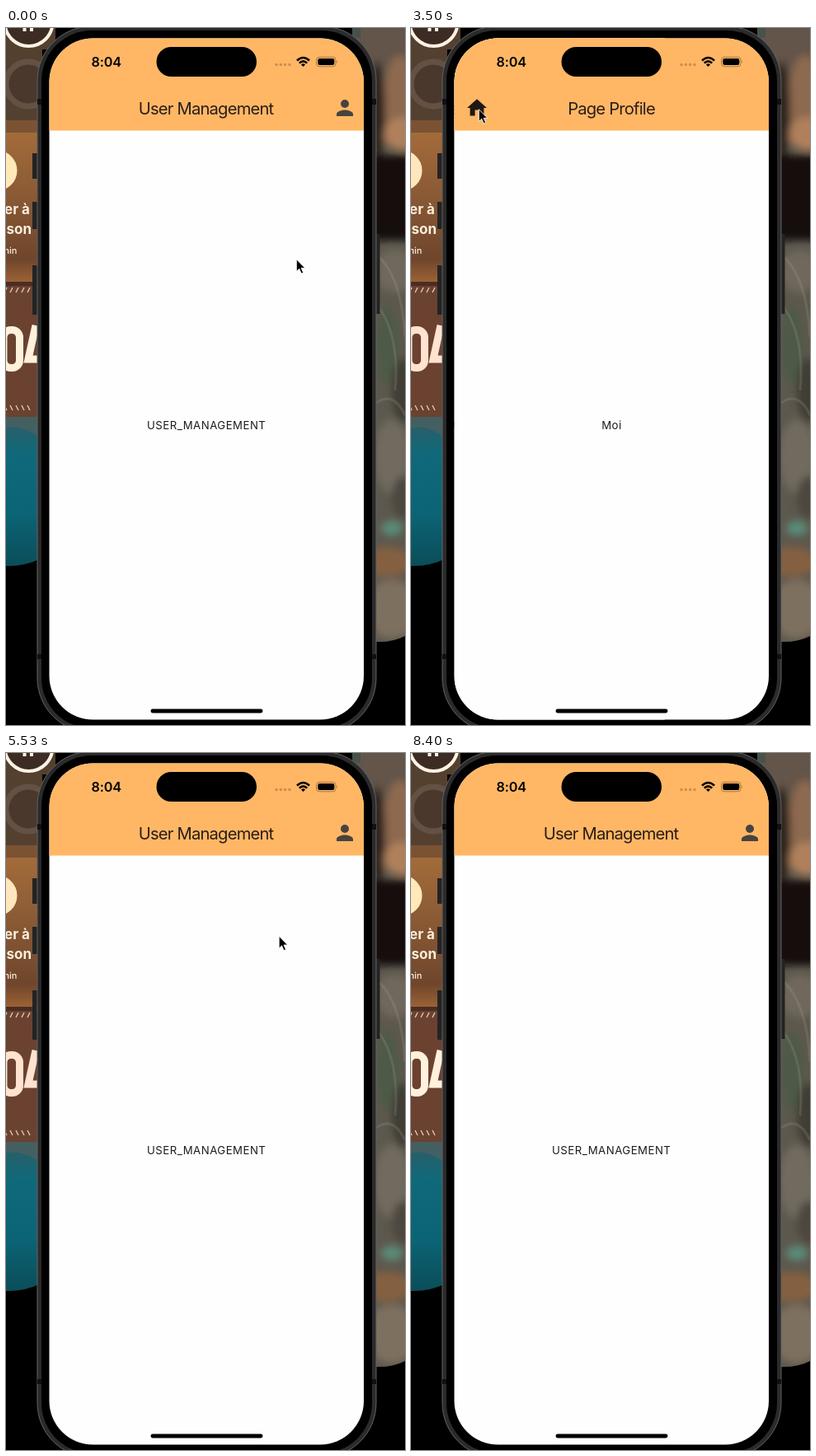
Animation of 484 by 846 pixels, one loop 8.82 s. Source, as an HTML page:

```html
<!DOCTYPE html>
<html lang="en">
<head>
<meta charset="utf-8">
<title>Page transition</title>
<style>
  html, body { margin: 0; height: 100%; overflow: hidden; background: #000; }
  svg { display: block; width: 484px; height: 846px; font-family: Inter, "Open Sans", sans-serif; }
  .title { font-size: 20.2px; letter-spacing: -.8px; text-anchor: middle; fill: #2b1d18; }
  .body { font-size: 13.2px; letter-spacing: .5px; text-anchor: middle; fill: #1d1b20; }
  .wall text { font-weight: 700; text-anchor: end; fill: #fbeedd; }
</style>
</head>
<body>
<svg viewBox="0 0 484 846">
  <defs>
    <clipPath id="screen"><rect x="52.5" y="12.5" width="381.5" height="827" rx="53"/></clipPath>
    <clipPath id="left"><rect width="44" height="846"/></clipPath>
    <clipPath id="right"><path d="M420 0H484V738Q468 746 449 745H420Z"/></clipPath>
    <filter id="soft" x="-50%" y="-50%" width="200%" height="200%"><feGaussianBlur stdDeviation="5"/></filter>
    <linearGradient id="wood" x2="0" y2="1">
      <stop stop-color="#a36b3a"/><stop offset=".35" stop-color="#8e5d36"/>
      <stop offset=".85" stop-color="#6f462c"/><stop offset="1" stop-color="#9c6236"/>
    </linearGradient>
    <linearGradient id="sea" x2="0" y2="1">
      <stop stop-color="#2f5c63"/><stop offset=".25" stop-color="#10697a"/>
      <stop offset=".65" stop-color="#0b6475"/><stop offset="1" stop-color="#0b4d59"/>
    </linearGradient>
    <linearGradient id="edge"><stop stop-color="#000" stop-opacity=".03"/><stop offset="1" stop-color="#000" stop-opacity=".04"/></linearGradient>
  </defs>

  <g class="wall" clip-path="url(#left)">
    <rect width="60" height="118" fill="#54402f"/>
    <rect y="112" width="60" height="16" fill="#7b5333"/>
    <circle cx="27" cy="68" r="27" fill="#4a382d" stroke="#655144" stroke-width="7"/>
    <rect y="127" width="60" height="181" fill="url(#wood)"/>
    <circle id="disc" cx="-11" cy="173" r="24.5"/>
    <text x="29" y="226" font-size="17">er à</text>
    <text x="31" y="250" font-size="17">son</text>
    <text x="13.5" y="274" font-size="11" style="font-weight:500">min</text>
    <rect y="308" width="60" height="164" fill="#6b4130"/>
    <rect y="308" width="60" height="5" fill="#4a2d22"/>
    <path d="M-2 321l3-6m4 6l3-6m4 6l3-6m4 6l3-6m4 6l3-6m4 6l3-6M1 464l-3-6m10 6l-3-6m10 6l-3-6m10 6l-3-6m10 6l-3-6" stroke="#e8cdbb" stroke-width="1.3"/>
    <g id="digits" fill="none" stroke-width="9">
      <rect x="-3" y="366.500" width="19.500" height="46" rx="9"/>
      <path d="M36 361L27 402H46"/>
    </g>
    <path d="M0 472H60V634Q30 654 0 653Z" fill="url(#sea)"/>
    <path d="M0 472H44V500Q20 480 0 486Z" fill="#56625e" opacity=".6"/>
  </g>
  <path d="M0 0H60V26H0Z" fill="#54402f"/>
  <circle cx="27.500" cy="-7" r="29" fill="#3d2c24" stroke="#fff3e4" stroke-width="4"/>
  <path d="M22.500 0V4M31 0V4" stroke="#fff3e4" stroke-width="4"/>

  <g clip-path="url(#right)">
    <rect x="420" width="64" height="760" fill="#5d584d"/>
    <g filter="url(#soft)">
      <rect x="425" y="-20" width="75" height="70" fill="#64554a"/>
      <ellipse cx="478" cy="85" rx="20" ry="52" fill="#8d6950"/>
      <ellipse cx="482" cy="128" rx="24" ry="20" fill="#b0805c"/>
      <ellipse cx="450" cy="100" rx="10" ry="60" fill="#2c231c"/>
      <rect x="440" y="154" width="60" height="104" fill="#15110e"/>
      <ellipse cx="472" cy="295" rx="24" ry="26" fill="#6f685c"/>
      <ellipse cx="462" cy="385" rx="14" ry="48" fill="#4e5a46"/>
      <ellipse cx="482" cy="440" rx="14" ry="40" fill="#3f3d35"/>
      <ellipse cx="468" cy="520" rx="22" ry="45" fill="#716a5f"/>
      <ellipse cx="482" cy="570" rx="14" ry="26" fill="#4e473f"/>
      <ellipse cx="468" cy="607" rx="13" ry="9" fill="#5a8c79"/>
      <ellipse cx="460" cy="648" rx="34" ry="18" fill="#84603f"/>
      <ellipse cx="468" cy="705" rx="32" ry="36" fill="#7e705f"/>
    </g>
    <path d="M449 275Q480 300 484 375M449 335Q478 370 472 440M449 455Q470 440 484 470" fill="none" stroke="#aaa394" stroke-width="3" opacity=".2"/>
    <rect x="420" width="10" height="12" fill="#47524a"/>
  </g>

  <g fill="#232323">
    <path d="M32 152h8v31h-8zM32 211h8v33h-8zM32 288h8v60h-8zM447 250h6.500v97h-6.500z"/>
    <rect x="38" y="-2" width="411" height="857" rx="66" fill="#2b2b2c" stroke="#626262"/>
    <path d="M38 86h5v7h-5zM38 760h5v6h-5zM444 86h5v7h-5zM444 760h5v6h-5z" fill="#111"/>
    <rect x="43" y="3" width="401" height="847" rx="61" fill="#000"/>
  </g>

  <g clip-path="url(#screen)">
    <g id="home">
      <rect x="52" y="12" width="383" height="828" fill="#fefefe"/>
      <rect x="52" y="12" width="383" height="112.500" fill="#ffb765"/>
      <text class="title" x="242.600" y="105">User Management</text>
      <circle id="homeInk" cx="411" cy="97" r="20.500"/>
      <path transform="translate(396 82) scale(1.25)" fill="#47433f" d="M12 12a4 4 0 1 0 0-8 4 4 0 0 0 0 8zm0 2c-2.670 0-8 1.340-8 4v2h16v-2c0-2.660-5.330-4-8-4z"/>
      <text class="body" x="243.200" y="487">USER_MANAGEMENT</text>
    </g>
    <g id="profile">
      <rect id="shade" x="47" y="124" width="5.500" height="720" fill="url(#edge)"/>
      <rect x="52.500" y="12" width="383" height="828" fill="#fefefe"/>
      <rect x="52.500" y="12" width="383" height="112.500" fill="#ffb765"/>
      <text class="title" x="243" y="105">Page Profile</text>
      <circle id="profileInk" cx="80" cy="97" r="20.500"/>
      <path transform="translate(65.600 82.600) scale(1.2)" fill="#1f1812" d="M10 20v-6h4v6h5v-8h3L12 3 2 12h3v8z"/>
      <text class="body" x="243.400" y="487">Moi</text>
    </g>
    <rect x="182.500" y="23" width="121.500" height="36" rx="18"/>
    <text x="103.600" y="47" font-size="16.200" font-weight="600" letter-spacing="-.2">8:04</text>
    <path d="M328 44.500h.01m5.300 0h.01m5.300 0h.01m5.300 0h.01" stroke="#c98f50" stroke-width="3.600" stroke-linecap="round"/>
    <g fill="none" stroke="#000" stroke-width="2.600">
      <path d="M353 39.500Q360.500 32.500 368 39.500M355.800 42.600Q360.500 38.200 365.200 42.600"/>
      <path d="M360.500 47L358 44.400Q360.500 42.200 363 44.400Z" fill="#000" stroke="none"/>
    </g>
    <rect x="376.500" y="35.300" width="23.500" height="11.500" rx="3.600" fill="none" stroke="#a5773f"/>
    <rect x="378.300" y="37" width="20" height="8" rx="2.200"/>
    <path d="M401.300 39.200q1.600 1.800 0 3.800z" fill="#a5773f"/>
    <rect x="175.500" y="826.600" width="136" height="4.800" rx="2.400"/>
  </g>

  <g id="cursor">
    <circle id="press" cx="-.500" cy=".800" r="21.300" fill="none" stroke="#000" stroke-width="1.500"/>
    <path d="M.300 .700V15.500l3.400-3.200 2.500 5.700 2.500-1.100-2.500-5.500h4.600z" stroke="#fff" stroke-width=".9"/>
  </g>
</svg>
<script>
const LOOP = 8820, TICK = 70, SLIDE = 350, WIDTH = 381.5;
const $ = id => document.getElementById(id);
const clamp = v => Math.min(1, Math.max(0, v));

// Cubic Bezier easing, solved for x by bisection.
function bezier(x1, y1, x2, y2) {
  const at = (a, b, s) => 3 * (1 - s) ** 2 * s * a + 3 * (1 - s) * s * s * b + s ** 3;
  return x => {
    if (x <= 0 || x >= 1) return clamp(x);
    let lo = 0, hi = 1;
    for (let i = 0; i < 24; i++) {
      const mid = (lo + hi) / 2;
      if (at(x1, x2, mid) < x) lo = mid; else hi = mid;
    }
    return at(y1, y2, lo);
  };
}

// The front page starts fast and settles slowly, in two joined curves.
const MX = .198, MY = .541;
const rise = bezier(.056 / MX, .024 / MY, .108 / MX, .3085 / MY);
const settle = bezier((.3655 - MX) / (1 - MX), 1, (.5465 - MX) / (1 - MX), (.989 - MY) / (1 - MY));
const front = u => u < MX ? MY * rise(u / MX) : MY + (1 - MY) * settle((u - MX) / (1 - MX));
const back = bezier(.35, .91, .33, .97);

const slides = [[1092, true], [3800, false], [5925, true], [7050.5, false]];
// Start and end of each press, with the button ink it lights, if any.
const presses = [
  [840, 1060, 'homeInk'], [3570, 3780, 'profileInk'], [4540, 4830],
  [5740, 5920, 'homeInk'], [6840, 7030, 'profileInk']
];
const path = [
  [70, 352, 280], [560, 403, 100], [1400, 403, 100], [1610, 379, 156],
  [1820, 290, 382], [1890, 250, 372], [2030, 305, 376], [2590, 305, 376],
  [3150, 66, 100], [3430, 82, 98], [3850, 82, 98], [4340, 289, 478],
  [4480, 314, 483], [4760, 314, 483], [5180, 165, 484], [5250, 165, 484],
  [5700, 409, 98], [6160, 409, 98], [6720, 82, 98], [7000, 82, 98],
  [7070, 82, 116], [7350, 289, 830], [7630, 289, 830], [7840, 289, 850]
];

function cursorAt(t) {
  const i = path.findIndex(p => p[0] > t);
  if (i < 0) return path[path.length - 1].slice(1);
  if (!i) return path[0].slice(1);
  const [t0, x0, y0] = path[i - 1], [t1, x1, y1] = path[i];
  const u = (t - t0) / (t1 - t0), e = u * u * (3 - 2 * u);
  return [x0 + (x1 - x0) * e, y0 + (y1 - y0) * e];
}

const move = (id, x, y = 0) => $(id).setAttribute('transform', `translate(${x} ${y})`);

// Ink fades in on press and lingers a little after release.
const inkAt = (t, id) => Math.max(...presses.map(([a, b, target]) =>
  target === id ? Math.min(clamp((t - a) / 100), clamp((b + 200 - t) / 150)) : 0));

function draw(t) {
  const [start, open] = slides.filter(s => s[0] <= t).pop() || [-SLIDE, false];
  const u = clamp((t - start) / SLIDE);
  const pose = ease => open ? ease(u) : 1 - ease(u);
  move('profile', (1 - pose(front)) * WIDTH);
  move('home', -pose(back) * WIDTH / 3);
  $('profile').style.display = open || u < 1 ? '' : 'none';
  $('shade').style.opacity = pose(v => v) ** 2;

  move('cursor', ...cursorAt(t));
  $('press').style.display = presses.some(([a, b]) => t >= a && t < b) ? '' : 'none';
  for (const id of ['homeInk', 'profileInk']) $(id).style.opacity = inkAt(t, id) * .08;

  const warm = t < 770 || t >= 8260;
  $('digits').style.stroke = warm ? '#fff1dc' : '#ffe2d0';
  $('disc').style.fill = warm ? '#ffe9b8' : '#ffe6bd';
}

// The picture advances in steps of one tick.
function frame(now) {
  draw(Math.floor(now % LOOP / TICK) * TICK);
  requestAnimationFrame(frame);
}
draw(0);
requestAnimationFrame(frame);
</script>
</body>
</html>
```
